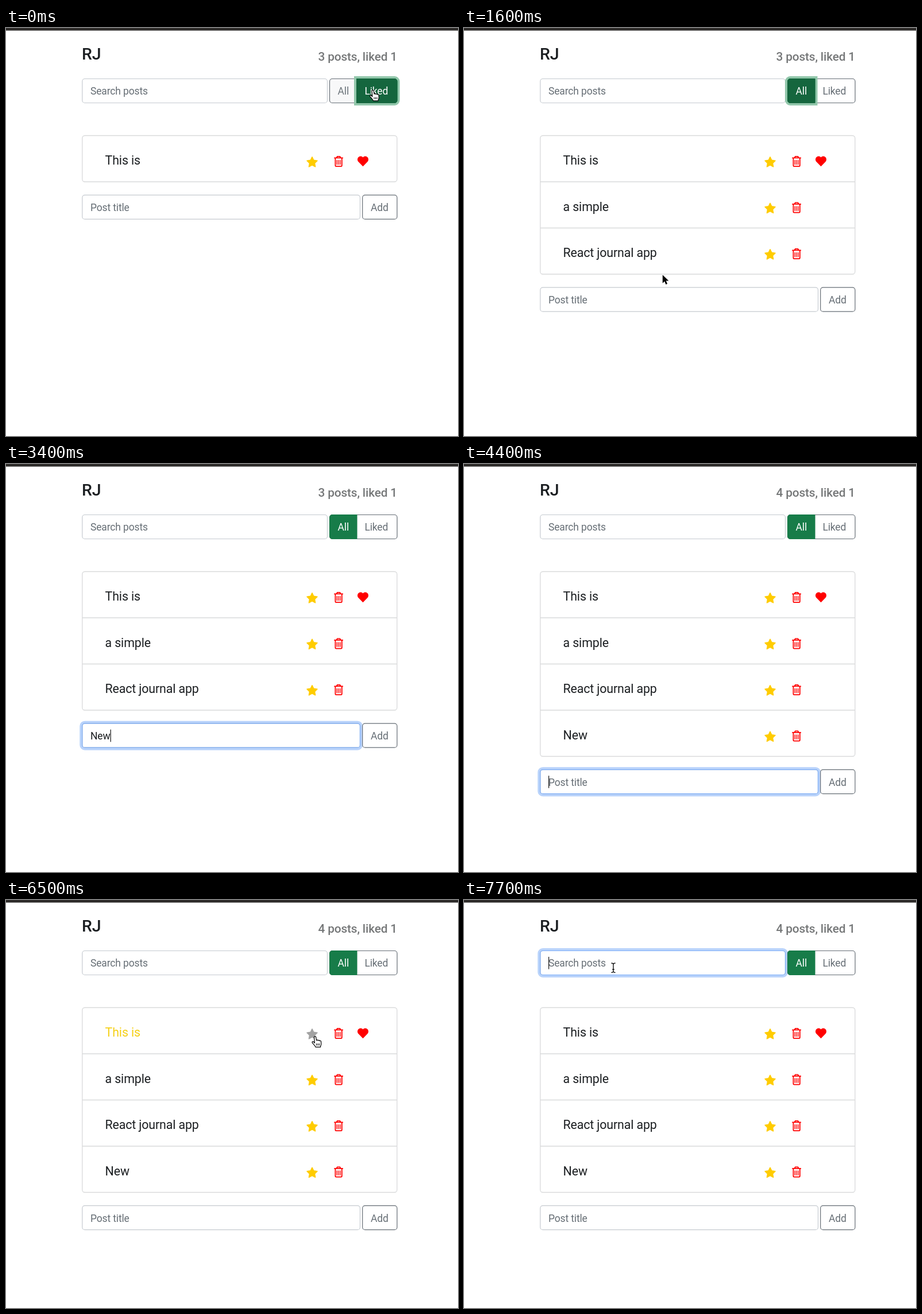
An HTML page that plays this animation: 787x711 px, repeating every 8000 ms.

```html
<!DOCTYPE html>
<html lang="en">
<head>
<meta charset="utf-8">
<title>Journal app</title>
<style>
html, body { margin: 0; width: 100%; height: 100%; overflow: hidden; background: #fff; }
svg { display: block; width: 787px; height: 711px; }
text { font-family: Roboto, Inter, sans-serif; letter-spacing: -.15px; white-space: pre; }
</style>
</head>
<body>
<svg id="stage" viewBox="0 0 787 711"></svg>
<script>
const LOOP = 8000, ROW = 80.5, LIST_TOP = 187.5;
const INK = '#1b1e21', GREY = '#666e75', LINE = '#d9dadb', GOLD = '#fc0';
const stage = document.getElementById('stage');

const ramp = (t, from, to) => Math.min(1, Math.max(0, (t - from) / (to - from)));
const within = (t, from, to) => t >= from && t < to;

// Pointer keys: time, x, y
const path = [
  [0, 638.5, 108], [100, 638.5, 108], [250, 627, 109], [400, 604, 110], [600, 590, 109],
  [1200, 590, 109], [1300, 538, 168], [1400, 456, 290], [1500, 386, 382], [1600, 346, 430],
  [1700, 324, 454], [1800, 314, 464], [4600, 314, 464], [4800, 328, 452], [5100, 430, 366],
  [5350, 522, 284], [5500, 541, 258], [5700, 539.5, 237.5], [6400, 539, 237.5], [6500, 538, 237.5],
  [6600, 539, 238], [6900, 539, 238], [7000, 480, 208], [7100, 360, 160], [7200, 284, 135],
  [7300, 260, 125], [7450, 260, 118], [LOOP, 260, 118]
];
const clicks = [[1000, 1250], [1900, 2200], [5800, 6100], [6600, 6900]];

function pointerAt(t) {
  const i = path.findIndex(k => k[0] > t);
  const [t0, x0, y0] = path[i - 1], [t1, x1, y1] = path[i];
  const k = ramp(t, t0, t1);
  return [x0 + (x1 - x0) * k, y0 + (y1 - y0) * k];
}

const text = (x, y, s, size, fill, extra = '') =>
  `<text x="${x}" y="${y}" font-size="${size}" fill="${fill}" ${extra}>${s}</text>`;

const box = (x, y, w, h, attrs) =>
  `<rect x="${x}" y="${y}" width="${w}" height="${h}" rx="4.5" ${attrs}/>`;

function input(y, w, label, value, focus, caret) {
  const x = 132.8, frame = attrs => box(x, y, w, 42, attrs);
  const caretX = 147.6 + [0, 12.3, 34.6][Math.min(value.length, 2)];
  return frame(`fill="none" stroke="#b9d3fb" stroke-width="9" opacity="${focus}"`) +
    frame('fill="#fff" stroke="#c5cad0" stroke-width="1.2"') +
    frame(`fill="none" stroke="#7badf8" stroke-width="1.2" opacity="${focus}"`) +
    text(147, y + 27.8, value || label, 17.5, value ? INK : GREY) +
    (caret ? `<path d="M${caretX} ${y + 10.5}v21.5" stroke="#111" stroke-width="1.2"/>` : '');
}

const ALL = 'M611 88.5H568a4.5 4.5 0 0 0-4.5 4.5v33a4.5 4.5 0 0 0 4.5 4.5h43z';
const LIKED = 'M610.5 88.5h66a4.5 4.5 0 0 1 4.5 4.5v33a4.5 4.5 0 0 1-4.5 4.5h-66z';

const outlineButton = (d, x, label, hover) =>
  `<path d="${d}" fill="#fff" stroke="#656d75" stroke-width="1.2"/>` + text(x, 116.3, label, 17.5, GREY) +
  `<g opacity="${hover}"><path d="${d}" fill="#68717a"/>${text(x, 116.3, label, 17.5, '#fff')}</g>`;

const activeButton = (d, x, label, on, focus) => `<g opacity="${on}">
  <path d="${d}" fill="none" stroke="#92c7ab" stroke-width="9" opacity="${focus}"/>
  <path d="${d}" fill="#177c49" stroke="#177c49"/>
  <path d="${d}" fill="#15663e" stroke="#15663e" opacity="${focus}"/>
  ${text(x, 116.3, label, 17.5, '#fff')}</g>`;

const starPoints = Array.from({ length: 10 }, (_, i) => {
  const r = i % 2 ? 4.7 : 9.4, a = i * Math.PI / 5;
  return [(533 + r * Math.sin(a)).toFixed(2), (234.2 - r * Math.cos(a)).toFixed(2)];
}).join(' ');

const star = color =>
  `<polygon points="${starPoints}" fill="${color}" stroke="${color}" stroke-width="1.6" stroke-linejoin="round"/>`;
const trash = `<g fill="none" stroke="red" stroke-linecap="round">
  <path d="M572 226.4h14.2M575.6 226l1.2-2.1h4.6l1.2 2.1M573.4 227v12.6q0 1.6 1.6 1.6h8.2q1.6 0 1.6-1.6V227" stroke-width="1.8"/>
  <path d="M576.3 230.4v7.4M579.1 230.4v7.4M581.9 230.4v7.4" stroke-width="1.4"/></g>`;
const heart = `<path fill="red" d="M621.5 241.3l-7.8-8c-2.4-2.5-2.2-6.6.4-8.6 2.3-1.8 5.4-1.4 7.4.8
  2-2.2 5.1-2.6 7.4-.8 2.6 2 2.8 6.1.4 8.6z"/>`;

function list(titles, starred) {
  const rows = titles.map((title, i) => `<g transform="translate(0 ${i * ROW})">
    ${i ? `<path d="M133 ${LIST_TOP}h548" stroke="${LINE}" stroke-width="1.3"/>` : ''}
    ${text(172.6, 238.4, title, 21.4, !i && starred ? '#f5d017' : INK)}
    ${star(!i && starred ? '#a3a3a3' : GOLD)}${trash}${i ? '' : heart}</g>`);
  return box(132.8, LIST_TOP, 548, titles.length * ROW, `fill="#fff" stroke="${LINE}" stroke-width="1.3"`) + rows.join('');
}

const shapes = {
  arrow: `<path d="M0 0v14.5l3.4-3.2 2.3 5.4 2.6-1.1L6 10.3h4.6z" fill="#000" stroke="#fff" stroke-width="1.2" paint-order="stroke"/>`,
  beam: `<path d="M-3.6-8q3 0 3.6 1.8.6-1.8 3.6-1.8M-3.6 8.4q3 0 3.6-1.8.6 1.8 3.6 1.8M0-6.5V7M-1.8 3h3.6" fill="none" stroke="#111" stroke-width="1.4"/>`,
  hand: `<path d="M-1.5 1.6c0-2 3-2 3.2 0l.9 5.6c.6-1.3 2.5-1 2.7.3.7-1 2.5-.8 2.7.5 1-.8 2.4-.2 2.5 1l.2 4.5c0 1.5-1 2.8-1.3 5.3H1
    C0 16-3 13.5-4.6 11.3c-1-1.5.8-2.8 2.2-1.5l1.8 1.8z" fill="#fff" stroke="#000" stroke-width="1.2" stroke-linejoin="round"/>
    <path d="M2.6 12.5v3.6M5 12.5v3.6M7.4 12.5v3.6" stroke="#000"/>`
};

function pointer(t, inputTop) {
  const [x, y] = pointerAt(t);
  const overField = (top, right) => within(x, 133, right) && within(y, top, top + 42);
  const overStar = within(x, 523, 543) && (y - 224) % ROW < 19 && within(y, 224, 500);
  const kind = overStar || (x > 563 && within(y, 88, 131)) ? 'hand'
    : overField(88.5, 560) || overField(inputTop, 617) ? 'beam' : 'arrow';
  const ring = clicks.some(([from, to]) => within(t, from, to))
    ? `<circle cx="${x}" cy="${y - .5}" r="34" fill="none" stroke="#000" stroke-width="1.6"/>` : '';
  return ring + `<g transform="translate(${x} ${y})">${shapes[kind]}</g>`;
}

function draw(t) {
  const titles = ['This is', 'a simple', 'React journal app', 'New']
    .slice(0, t < 1200 ? 1 : t < 3700 ? 3 : 4);
  const posts = t < 3700 ? 3 : 4;
  const inputTop = LIST_TOP + titles.length * ROW + 23.2;
  const typed = within(t, 2900, 3400) ? 'N' : within(t, 3400, 3700) ? 'New' : '';
  const postFocus = ramp(t, 2100, 2250) - ramp(t, 6000, 6150);
  const postCaret = within(t, 2200, 2700) || within(t, 2900, 3900) ||
    within(t, 4400, 4900) || within(t, 5400, 5960);
  const all = ramp(t, 1200, 1350);
  const allHover = t < 100 ? .04 : ramp(t, 350, 500) * (1 - all);

  stage.innerHTML =
    '<rect width="787" height="4.5" fill="#2d2b29"/>' +
    text(132, 55, 'RJ', 28.5, INK, 'font-weight="500"') +
    text(681, 56.5, posts + ' posts, liked 1', 20.8, '#757778', 'font-weight="500" text-anchor="end"') +
    input(88.5, 426.7, 'Search posts', '', ramp(t, 7500, 7650), t >= 7600) +
    outlineButton(ALL, 577.6, 'All', allHover) +
    outlineButton(LIKED, 624.4, 'Liked', 0) +
    activeButton(LIKED, 624.4, 'Liked', 1 - all, 1) +
    activeButton(ALL, 577.6, 'All', all, 1 - ramp(t, 2100, 2250)) +
    list(titles, within(t, 6100, 6850)) +
    input(inputTop, 483.7, 'Post title', typed, postFocus, postCaret) +
    box(620.7, inputTop, 60.2, 42, 'fill="#fff" stroke="#656d75" stroke-width="1.2"') +
    text(635, inputTop + 27.8, 'Add', 17.5, GREY) +
    (within(t, 2900, 4700) ? '' : pointer(t, inputTop));
}

const start = performance.now();
function tick() {
  draw((performance.now() - start) % LOOP);
  requestAnimationFrame(tick);
}
tick();
</script>
</body>
</html>
```
